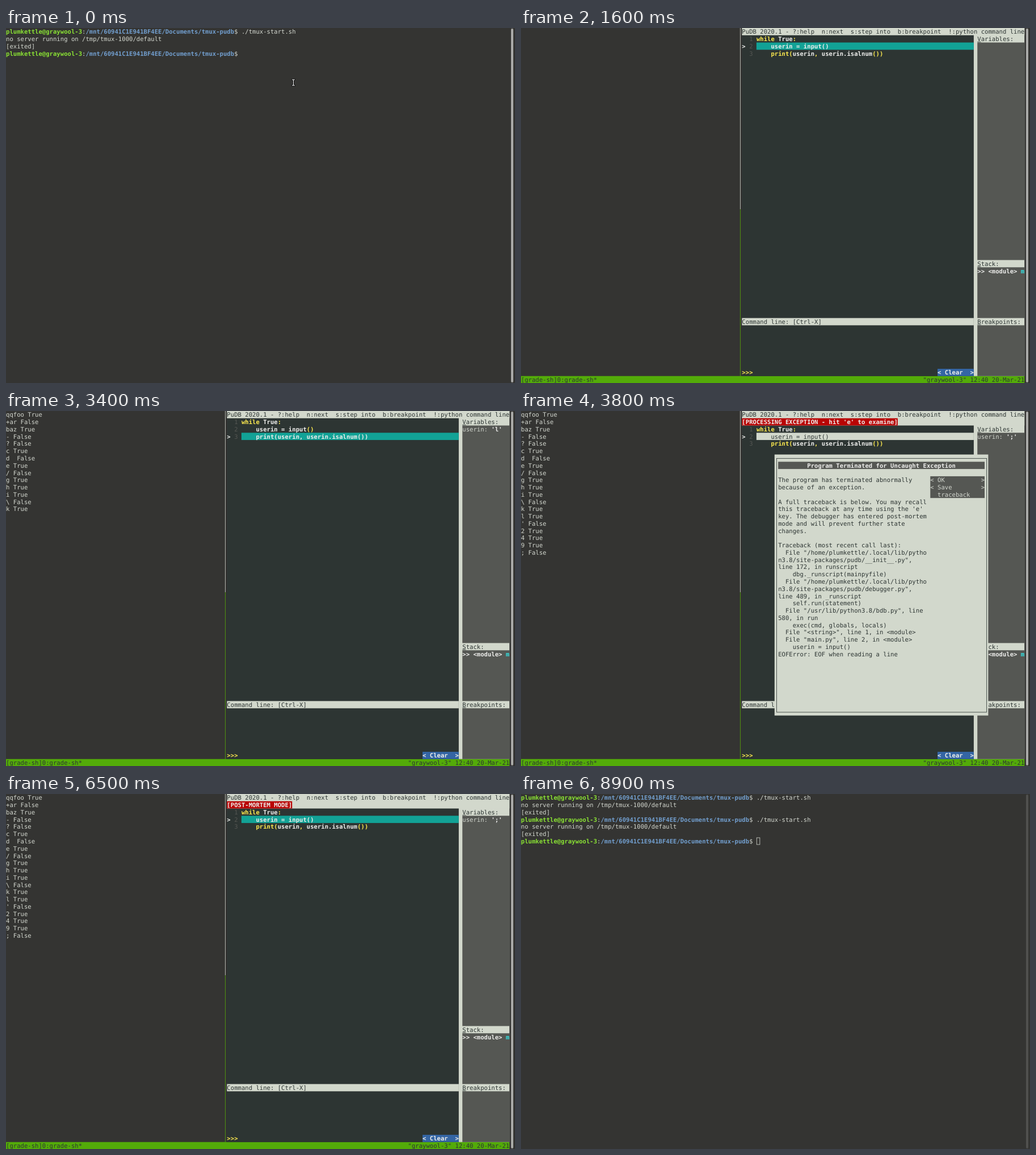
These frames come from a looping animation (897x625 px, 9 s). An HTML page with a canvas:

```html
<!DOCTYPE html>
<html lang="en">
<head>
<meta charset="utf-8">
<title>Debugger session in a terminal</title>
<style>
html, body { margin: 0; width: 100%; height: 100%; overflow: hidden; background: #343432; }
canvas { display: block; width: 897px; height: 625px; }
</style>
</head>
<body>
<canvas id="stage" width="897" height="625"></canvas>
<script>
const LOOP = 9000;
const CW = 6.383, CH = 12.766, LINE = CW / 8;
const BASELINE = 10.4;
const FONT = '10.6px "DejaVu Sans Mono", monospace';
const C = {
  term: '#343432', fg: '#d3d7cf', light: '#d2d8cc', white: '#eeeeec', dark: '#2d3533',
  gray: '#555753', yellow: '#fce94f', green: '#53ab09', teal: '#12a296', blue: '#3465a4',
  red: '#b90404', user: '#8ae234', path: '#729fcf', cyan: '#34e2e2'
};
const HOST = 'graywool-3', USER = 'plumkettle';
const COMMAND = './tmux-start.sh';
const INPUTS = ['qqfoo', '+ar', 'baz', '-', '?', 'c', 'd ', 'e', '/', 'g',
  'h', 'i', '\\', 'k', 'l', "'", '2', '4', '9', ';'];
const RIGHT = 61, DIVIDER = 125, SIDE = 126, END = 139;

const SOURCE = [
  [['while', C.yellow], [' True', C.white], [':', C.yellow]],
  [['    userin = input', C.white], ['()', C.yellow]],
  [['    print(', C.yellow], ['userin', C.white], [',', C.yellow],
    [' userin.isalnum', C.white], ['())', C.yellow]]
];

const MESSAGE = `The program has terminated abnormally
because of an exception.

A full traceback is below. You may recall
this traceback at any time using the 'e'
key. The debugger has entered post-mortem
mode and will prevent further state
changes.

Traceback (most recent call last):
  File "/home/${USER}/.local/lib/pytho
n3.8/site-packages/pudb/__init__.py",
line 172, in runscript
    dbg._runscript(mainpyfile)
  File "/home/${USER}/.local/lib/pytho
n3.8/site-packages/pudb/debugger.py",
line 489, in _runscript
    self.run(statement)
  File "/usr/lib/python3.8/bdb.py", line
580, in run
    exec(cmd, globals, locals)
  File "<string>", line 1, in <module>
  File "main.py", line 2, in <module>
    userin = input()
EOFError: EOF when reading a line`.split('\n');

const ctx = document.getElementById('stage').getContext('2d');

function rect(x, y, w, h, color) {
  ctx.fillStyle = color;
  ctx.fillRect(x, y, w, h);
}

// Fills whole cells from (c0, r0) up to, not including, (c1, r1).
function cells(c0, r0, c1, r1, color) {
  rect(c0 * CW, r0 * CH, (c1 - c0) * CW, (r1 - r0) * CH, color);
}

// Strokes a box with its edges just inside the given bounds.
function outline(x0, y0, x1, y1, color) {
  ctx.strokeStyle = color;
  ctx.lineWidth = LINE;
  ctx.strokeRect(x0 + LINE / 2, y0 + LINE / 2, x1 - x0 - LINE, y1 - y0 - LINE);
}

function text(str, col, row, color = C.fg, bold = false) {
  ctx.font = (bold ? 'bold ' : '') + FONT;
  ctx.fillStyle = color;
  [...str].forEach((ch, i) => {
    if (ch !== ' ') ctx.fillText(ch, (col + i) * CW, row * CH + BASELINE);
  });
  return col + str.length;
}

function hotLabel(str, row) {
  text(str, SIDE, row, C.dark);
  rect(SIDE * CW, row * CH + 11.2, CW, LINE, C.dark);
}

function cursor(col, row) {
  cells(col, row, col + 1, row + 1, C.fg);
}

function scrollbar(focused) {
  ctx.fillStyle = focused ? '#aaaaa8' : '#50504e';
  ctx.beginPath();
  ctx.roundRect(890, 1, 4, 623, 2);
  ctx.fill();
}

function pointer(x, y) {
  const beam = (grow, color) => {
    rect(x - 0.5 - grow, y - 5 - grow, 1 + 2 * grow, 10 + 2 * grow, color);
    for (const end of [-5.5, 4.5]) {
      rect(x - 2.5 - grow, y + end - grow, 5 + 2 * grow, 1 + 2 * grow, color);
    }
  };
  beam(1, '#111111');
  beam(0, '#ffffff');
}

function prompt(row, command = '') {
  let col = text(`${USER}@${HOST}`, 0, row, C.user, true);
  col = text(':', col, row);
  col = text('/mnt/60941C1E941BF4EE/Documents/tmux-pudb', col, row, C.path, true);
  col = text('$ ', col, row);
  return text(command, col, row);
}

function noServer(row) {
  text('no server running on /tmp/tmux-1000/default', 0, row);
}

function session(row) {
  prompt(row, COMMAND);
  noServer(row + 1);
  text('[exited]', 0, row + 2);
}

function shellBefore(t) {
  session(0);
  const col = prompt(3, t < 400 ? '' : COMMAND);
  if (t >= 800) {
    noServer(4);
    cursor(0, 5);
  } else if (t >= 400) {
    cursor(col, 3);
  }
  if (t < 500) pointer(506.5, 96);
}

function shellAfter(t) {
  session(0);
  session(3);
  const col = prompt(6);
  if (t >= 8900) {
    outline(col * CW, 6 * CH, (col + 1) * CW, 7 * CH, C.fg);
  } else if (Math.floor((t - 6800) / 600) % 2 === 0) {
    cursor(col, 6);
  }
  if (t >= 8200 && t < 8300) pointer(368.5, 102.5);
  if (t >= 8300 && t < 8400) pointer(313.5, 108.5);
}

function tmuxFrame() {
  const x = 60.5 * CW;
  rect(x, 0, LINE, 25 * CH, C.fg);
  rect(x, 25 * CH, LINE, 23 * CH, C.green);
  cells(0, 48, END, 49, C.green);
  text('[grade-sh]0:grade-sh*', 0, 48, C.dark);
  text(`"${HOST}" 12:40 20-Mar-21`, 111, 48, C.dark);
}

// Number of debugger steps taken while the "next" key is held down.
function stepsAt(t) {
  if (t < 2500) return 0;
  if (t >= 3800) return 40;
  return Math.round(10 + (Math.floor(t / 100) - 28) * 19 / 6);
}

function quote(s) {
  return s.includes("'") ? `"${s}"` : `'${s.replace('\\', '\\\\')}'`;
}

function sourceView(top, line, focused) {
  SOURCE.forEach((spans, i) => {
    const row = top + i;
    const current = i === line;
    if (current) {
      cells(65, row, DIVIDER, row + 1, focused ? C.teal : C.light);
      text('>', RIGHT, row, C.white, true);
    }
    text(String(i + 1), 63, row, C.gray);
    let col = 65;
    for (const [str, color] of spans) {
      if (!current) col = text(str, col, row, color, true);
      else col = text(str, col, row, focused ? C.white : C.dark, focused);
    }
  });
}

function sidePanel(top, steps) {
  cells(DIVIDER, 0, END, 48, C.light);
  cells(SIDE, top + 1, END, 32, C.gray);
  cells(SIDE, 33, END, 40, C.gray);
  cells(SIDE, 41, END, 48, C.gray);
  hotLabel('Variables:', top);
  if (steps > 0) {
    const value = quote(INPUTS[Math.ceil(steps / 2) - 1]);
    text('userin:', SIDE, top + 1);
    if (value.length > 5) text(value, SIDE + 2, top + 2, C.white, true);
    else text(value, SIDE + 8, top + 1, C.white, true);
  }
  hotLabel('Stack:', 32);
  text('>> <module> ', SIDE, 33, C.white, true);
  text('m', END - 1, 33, C.cyan, true);
  hotLabel('Breakpoints:', 40);
}

function header(failed, open) {
  cells(RIGHT, 0, END, failed ? 2 : 1, C.light);
  text('PuDB 2020.1 - ?:help  n:next  s:step into  b:breakpoint  !:python command line',
    RIGHT, 0, C.dark);
  if (!failed) return;
  const banner = open ? "[PROCESSING EXCEPTION - hit 'e' to examine]" : '[POST-MORTEM MODE]';
  cells(RIGHT, 1, RIGHT + banner.length, 2, C.red);
  text(banner, RIGHT, 1, C.white, true);
}

function commandLine() {
  cells(RIGHT, 40, DIVIDER, 41, C.light);
  text('Command line: [Ctrl-X]', RIGHT, 40, C.dark);
  text('>>>', RIGHT, 47, C.yellow, true);
  cells(115, 47, DIVIDER, 48, C.blue);
  text('< Clear  >', 115, 47, C.white, true);
}

function dialog(t) {
  cells(70, 6, 129, 42, C.light);
  outline(70.5 * CW, 6.5 * CH, 128.5 * CW + LINE, 41.5 * CH + LINE, C.dark);
  cells(71, 7, 128, 8, C.gray);
  text('Program Terminated for Uncaught Exception', 79, 7, C.white, true);
  MESSAGE.forEach((str, i) => text(str, 71, 9 + i, C.dark));

  const active = t >= 5700;
  cells(113, 9, 128, 12, C.gray);
  if (active) cells(113, 9, 128, 10, C.teal);
  ['OK', 'Save'].forEach((name, i) => {
    const bold = active && i === 0;
    const color = bold ? C.white : C.fg;
    text('< ' + name, 113, 9 + i, color, bold);
    text('>', 127, 9 + i, color, bold);
  });
  text('traceback', 115, 11);
  if (active && t < 6300) {
    cursor(115, 9);
    text('O', 115, 9, C.dark, true);
  }
}

function debuggerView(t) {
  const steps = stepsAt(t);
  const failed = t >= 3800;
  const open = failed && t < 6500;
  const top = failed ? 2 : 1;

  for (let i = 0; i < Math.floor(steps / 2); i++) {
    text(`${INPUTS[i]} ${/^[a-z0-9]+$/.test(INPUTS[i]) ? 'True' : 'False'}`, 0, i);
  }
  cells(RIGHT, 0, DIVIDER, 48, C.dark);
  sidePanel(top, steps);
  header(failed, open);
  sourceView(top, steps % 2 ? 2 : 1, !open);
  commandLine();
  if (open) dialog(t);
}

function draw(t) {
  rect(0, 0, 897, 625, C.term);
  if (t < 1300) {
    shellBefore(t);
  } else if (t < 6800) {
    tmuxFrame();
    if (t >= 1600) debuggerView(t);
    else cursor(RIGHT, 0);
  } else {
    shellAfter(t);
  }
  scrollbar(t < 8900);
}

ctx.textBaseline = 'alphabetic';
ctx.textRendering = 'geometricPrecision';
function tick() {
  draw(performance.now() % LOOP);
  requestAnimationFrame(tick);
}
tick();
</script>
</body>
</html>
```
